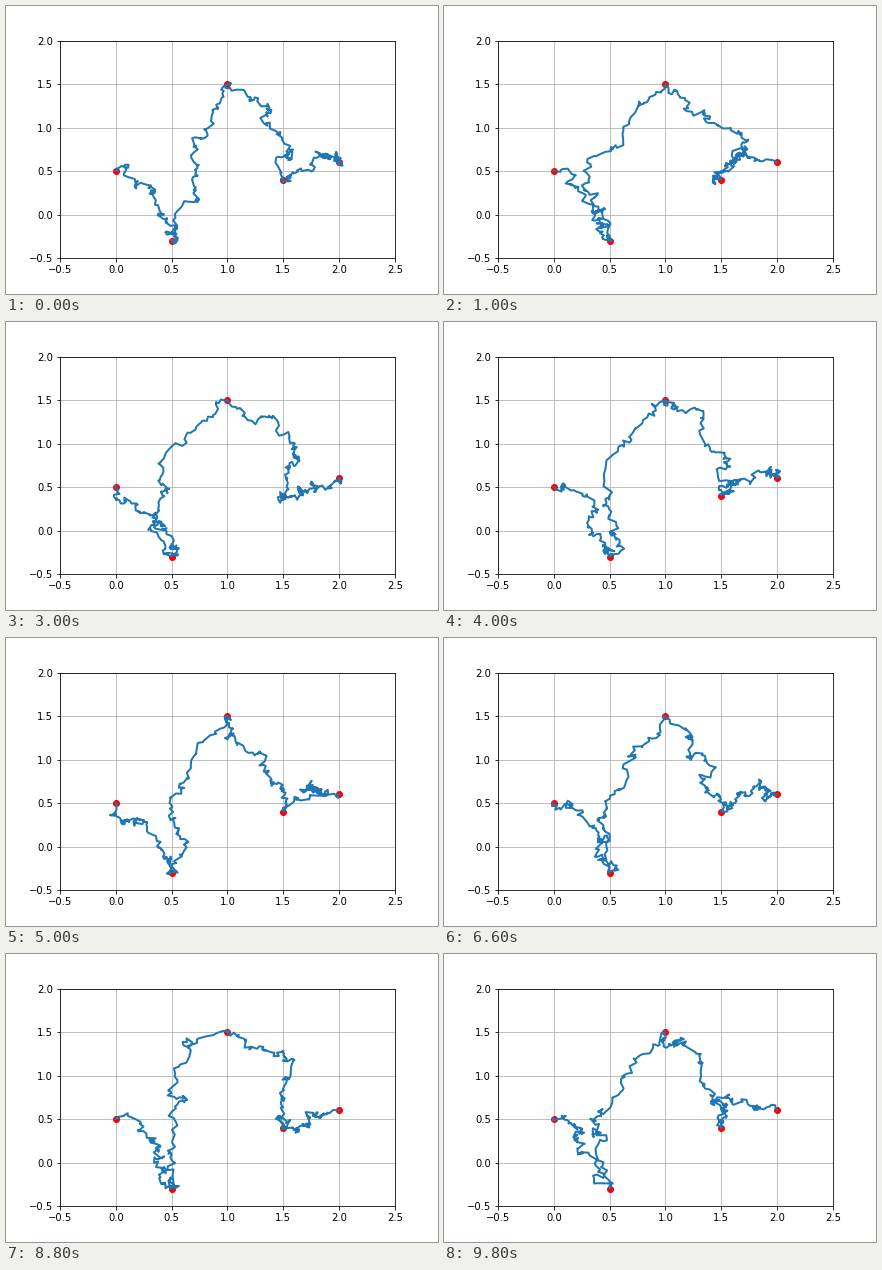
Write a matplotlib script that moves like this. It is 432 px wide and 288 px high and loops after 10000 ms.

```python
import numpy as np
import matplotlib.pyplot as plt
from matplotlib.animation import FuncAnimation

FRAMES, INTERVAL = 50, 200
STEPS = 80        # random steps from one node to the next
SIGMA = 0.024     # spread of one step
BOW = 0.14        # how far each leg bends to its left, relative to its length

NODES = np.array([(0, 0.5), (0.5, -0.3), (1, 1.5), (1.5, 0.4), (2, 0.6)])


def leg(a, b, rng):
    """Bowed random walk that starts at a and arrives exactly at b."""
    t = np.arange(STEPS + 1)[:, None] / STEPS
    dx, dy = b - a
    left = np.array([-dy, dx])
    walk = np.cumsum(rng.normal(0, SIGMA, (STEPS + 1, 2)), axis=0)
    walk -= walk[0]
    noise = walk - walk[-1] * t
    return a + (b - a) * t + BOW * left * np.sin(np.pi * t) + noise


def route(i):
    rng = np.random.default_rng(100 + i)
    return np.vstack([leg(a, b, rng) for a, b in zip(NODES, NODES[1:])])


fig, ax = plt.subplots(figsize=(6, 4), dpi=72)
fig.subplots_adjust(left=0.125, right=0.9, bottom=0.125, top=0.88)
ax.set(xlim=(-0.5, 2.5), ylim=(-0.5, 2))
ax.grid(True)
ax.plot(*NODES.T, "o", color="red")
line, = ax.plot([], [], color="tab:blue", lw=2)


def update(i):
    line.set_data(*route(i).T)
    return line,


anim = FuncAnimation(fig, update, frames=FRAMES, interval=INTERVAL,
                     repeat=True, repeat_delay=0)
plt.show()
```
